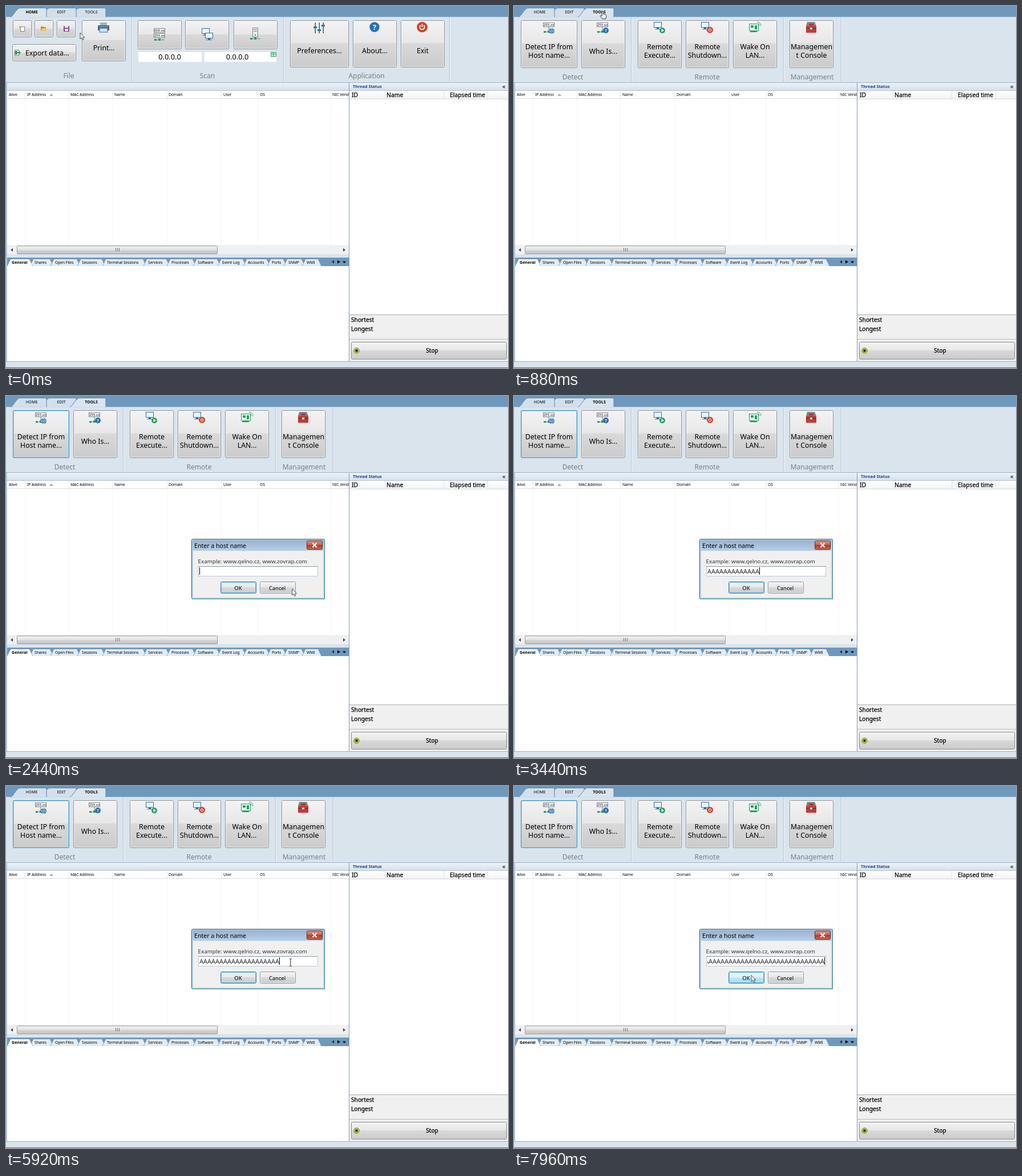
An HTML page for the animation above (8000 ms loop, 880 by 636 pixels).

```html
<!DOCTYPE html>
<html lang="en">
<head>
<meta charset="utf-8">
<title>Network scanner</title>
<style>
  html, body { margin: 0; width: 100%; height: 100%; overflow: hidden; background: #fff; }
  svg { display: block; }
  text { font-family: "Noto Sans", "Open Sans", sans-serif; fill: #000; white-space: pre; }
  .mid { text-anchor: middle; }
  .end { text-anchor: end; }
  .bold { font-weight: 700; }
  .firm { stroke: #000; stroke-width: .25; }
  .group { fill: #77808a; }
  .line { fill: none; }
</style>
</head>
<body>
<svg id="stage" width="880" height="636" viewBox="0 0 880 636" xmlns="http://www.w3.org/2000/svg"></svg>
<script>
const BAR = '#6f99bc', PANEL = '#dae4ed', BLUE = '#2a6fb4', GREEN = '#27a060', RED = '#d0452c', GREY = '#7d8387';

// Markup helpers
const rect = (x, y, w, h, fill, more = '') => `<rect x="${x}" y="${y}" width="${w}" height="${h}" fill="${fill}" ${more}/>`;
const box = (x, y, w, h, fill, stroke, r = 0) =>
  rect(x + .5, y + .5, w - 1, h - 1, fill, `stroke="${stroke}" rx="${r}"`);
const path = (d, fill, more = '') => `<path d="${d}" fill="${fill}" ${more}/>`;
const stroke = (d, color, w = 1) => `<path class="line" d="${d}" stroke="${color}" stroke-width="${w}"/>`;
const disc = (x, y, r, fill) => `<circle cx="${x}" cy="${y}" r="${r}" fill="${fill}"/>`;
const text = (x, y, size, str, cls = '', more = '') =>
  `<text x="${x}" y="${y}" font-size="${size}" class="${cls}" ${more}>${str}</text>`;
const group = (id, body) => `<g id="${id}">${body}</g>`;
const at = (x, y, body) => `<g transform="translate(${x} ${y})">${body}</g>`;
const grad = (id, ...stops) => `<linearGradient id="${id}" x2="0" y2="1">` +
  stops.map(([o, c]) => `<stop offset="${o}" stop-color="${c}"/>`).join('') + '</linearGradient>';

const button = (x, y, w, h, lines = [], base = 0) =>
  box(x, y, w, h, 'url(#btn)', '#8d9297', 2) +
  rect(x + 1.5, y + 1.5, w - 3, h - 3, 'none', 'stroke="#fff" stroke-opacity=".65" rx="1"') +
  lines.map((s, i) => text(x + w / 2, base + i * 15, 12.3, s, 'mid')).join('');
const divider = x => rect(x, 20, 1, 113, '#b4c3d1') + rect(x + 1, 20, 1, 113, '#f2f6fa');

// Icons, drawn around their own centre
const monitor = (x, y) => box(x, y, 14, 10, '#eef5fc', BLUE) + rect(x + 5, y + 10, 4, 2, BLUE) + rect(x + 2, y + 12, 10, 1, BLUE);
const power = r => disc(0, 0, r, RED) +
  stroke(`M${-r * .3} ${-r * .33}A${r * .45} ${r * .45} 0 1 0 ${r * .3} ${-r * .33}M0 ${-r * .6}V0`, '#fff', r * .18);
const help = r => disc(0, 0, r, BLUE) + text(0, r * .53, r * 1.5, '?', 'mid bold', 'style="fill:#fff"');
const field = (y, s) => box(-10, y, 20, 8, '#fff', GREY) + text(0, y + 6.4, 6, s, 'mid');
const wire = y => rect(-9, y, 18, 1, GREY) + rect(-2, y - 2, 4, 4, GREEN) + rect(-9, y - 1, 4, 3, GREEN);
const address = field(-10, '255.xx') + rect(-.5, -2, 1, 7, GREY) + wire(6);
const globe = disc(5, 5, 5, BLUE) +
  stroke('M0 5H10M5 0V10M5 0C1 3 1 7 5 10C9 7 9 3 5 0', '#dcecfb', .7);
const play = disc(4, 5, 5, GREEN) + path('M2.5 2L7 5L2.5 8Z', '#fff');
const printer = rect(-6, -9, 12, 6, '#9eb3c6') + rect(-10, -4, 20, 9, '#55616d', 'rx="1"') +
  rect(-7, 1, 14, 7, '#cfe2f4', `stroke="${BLUE}"`) + rect(-8, -2, 16, 1, '#8fb8dd');
const sliders = [-7, 0, 7].map((x, i) =>
  rect(x - .5, -9, 1.5, 19, '#3b5871') + rect(x - 3, [-2, 3, -5][i], 6, 3, BLUE)).join('');
const server = box(-5, -11, 10, 17, '#e9ecee', GREY) + rect(-3, -8, 6, 1, GREY) + rect(-3, -5, 6, 1, GREY) +
  disc(0, 2, 1.2, GREEN) + wire(8);
const card = box(-10, -7, 17, 13, '#e7f6ec', GREEN) + rect(-7, -4, 5, 4, GREEN) + rect(0, -4, 4, 7, GREEN) +
  rect(-8, 6, 12, 2, GREEN) + stroke('M4 -7A4 4 0 0 1 8 -3M4 -10A7 7 0 0 1 11 -3', GREEN);
const toolbox = path('M-9 -4L-7 -11H6L9 -4Z', '#7a858c') + rect(-4, -8, 8, 3, '#b13029') +
  rect(-9, -4, 18, 12, '#c33a32', 'rx="1"') + rect(-9, 0, 18, 1, '#7d211d') + rect(-2, -1, 4, 3, '#eee');

// Ribbon tabs: earlier ones overlap later ones, the active one lies on top
const tabs = [['HOME', 23, 71, 45], ['EDIT', 75, 123, 97], ['TOOLS', 127, 175, 149.5]];
const ribbonTab = ([name, l, r, c], active) =>
  path(`M${l - 15} 19.5C${l - 9} 17 ${l - 5} 3.5 ${l + 2} 3.5H${r - 2}Q${r} 3.5 ${r} 5.5V19.5`,
    active ? PANEL : '#d3dfeb', 'stroke="#5d83a6"') +
  text(c, 13.2, 6.9, name, active ? 'mid bold' : 'mid');
const ribbonTabs = on => [2, 1, 0].filter(i => i !== on).concat(on).map(i => ribbonTab(tabs[i], i === on)).join('');

const homePage =
  [220, 486, 777].map(divider).join('') +
  button(12, 25, 33, 30) + button(50, 25, 33, 30) + button(89, 25, 33, 30) +
  at(28, 40, box(-3, -4, 8, 9, '#fff', GREY) + disc(-3, -3, 2, '#e8a93a')) +
  at(66, 40, path('M-5 -4H-1L0 -3H4V4H-5Z', '#c98b34') + path('M-3 -1H6L4 4H-5Z', '#f2c46c')) +
  at(106, 40, rect(-5, -5, 10, 10, '#8548a5', 'rx="1"') + rect(-3, -5, 6, 3, '#fff') + rect(-3, 0, 6, 4, '#f0e4f5')) +
  button(11, 67, 112, 30) + text(34, 86.5, 12.3, 'Export data...') +
  at(20, 82, box(-5, -5, 8, 10, '#fff', GREY) + rect(-4, -3, 4, 6, GREEN) + path('M0 -1H3V-3L6 0L3 3V1H0Z', GREEN)) +
  button(133, 25, 77, 72, ['Print...'], 77.5) + at(171, 38, printer) +
  button(231, 25, 77, 51) + button(314, 25, 77, 51) + button(399, 25, 77, 51) +
  at(269, 49, field(-10, '000.xx') + field(-1, '255.xx') + wire(10)) +
  monitor(343, 39) + monitor(349, 47) + at(437, 49, server) +
  box(231, 80, 113, 19, '#fff', '#e3e8ed') + box(347, 80, 128, 19, '#fff', '#e3e8ed') +
  text(287, 93.7, 12.8, '0.0.0.0', 'mid') + text(405.5, 93.7, 12.8, '0.0.0.0', 'mid') +
  at(469, 85, box(-5, -4, 10, 8, '#dff3e5', GREEN) + stroke('M-4 -.5H4M-.5 -3V3', GREEN)) +
  button(498, 25, 103, 83, ['Preferences...'], 82.5) + at(549, 38, sliders) +
  button(608, 25, 77, 83, ['About...'], 82.5) + at(646, 37, help(8.7)) +
  button(692, 25, 77, 83, ['Exit'], 82.5) + at(729.5, 37, power(9.3)) +
  [['File', 110], ['Scan', 353], ['Application', 632]].map(([s, x]) => text(x, 127.3, 12, s, 'mid group')).join('');

const toolsPage =
  [205, 472, 573].map(divider).join('') +
  button(12, 25, 99, 84, ['Detect IP from', 'Host name...'], 76) + at(61, 39, address + globe) +
  button(118, 25, 77, 84, ['Who Is...'], 83.5) + at(155, 39, address + at(6, 4, help(5))) +
  button(217, 25, 77, 84, ['Remote', 'Execute...'], 76) + monitor(245, 28) + at(256, 38, play) +
  button(301, 25, 76, 84, ['Remote', 'Shutdown...'], 76) + monitor(328, 28) + at(343.5, 42, power(5.5)) +
  button(384, 25, 77, 84, ['Wake On', 'LAN...'], 76) + at(422, 38, card) +
  button(483, 25, 77, 84, ['Managemen', 't Console'], 76) + at(521, 39, toolbox) +
  group('hot', box(12, 25, 99, 84, 'none', '#3c8fc4', 2) +
    rect(13.5, 26.5, 96, 81, 'none', 'stroke="#8fd0f0" stroke-opacity=".8"')) +
  [['Detect', 103], ['Remote', 338.5], ['Management', 522.5]].map(([s, x]) => text(x, 128.5, 12, s, 'mid group')).join('');

// Result list, detail tabs and thread panel
const small = (x, y, s) => text(x, y, 6.8, s, '', 'letter-spacing="-.1"');
const columns = [['Alive', 5], ['IP Address', 37], ['MAC Address', 113], ['Name', 190], ['Domain', 285],
  ['User', 381], ['OS', 445], ['NIC Vend', 572]];
const details = [['General', 10], ['Shares', 50], ['Open Files', 86], ['Sessions', 133], ['Terminal Sessions', 177],
  ['Services', 249], ['Processes', 290], ['Software', 336], ['Event Log', 379], ['Accounts', 424],
  ['Ports', 466], ['SNMP', 495], ['WMI', 527]];
const detailTab = ([name, x], i) => {
  const next = i < 12 ? details[i + 1][1] : 556;
  return path(`M${x - 8} 457L${x - 2} 444.5H${next - 9}L${next - 3} 457`, i ? '#e3ebf3' : '#fff', 'stroke="#6c90b0" stroke-width=".7"') +
    (i ? small(x, 452.8, name) : text(x, 452.8, 7.1, name, 'bold'));
};
const detailTabs = details.map(detailTab);
const main =
  rect(0, 134, 880, 502, '#fff') +
  rect(0, 134, 880, 15, 'url(#strip)') + rect(0, 134, 880, 1, '#9fb2c5') + rect(0, 148, 880, 1, '#b4c1cf') +
  rect(0, 162, 601, 1, '#d9dcdf') +
  [33, 110, 186, 282, 377, 441, 569].map(x => rect(x, 150, 1, 12, '#e4e6e8') +
    stroke(`M${x + .5} 163V420`, '#f6f6f6')).join('') +
  columns.map(([s, x]) => small(x, 158, s)).join('') + path('M76 158L79.5 154L83 158Z', '#a5a9ad') +
  rect(2, 420, 599, 16, '#eff0f1') + box(19, 421, 352, 15, 'url(#thumb)', '#989b9e', 1) +
  [192, 195, 198].map(x => rect(x, 425, 1, 6, '#777')).join('') +
  path('M12 425.5V431.5L8 428.5Z', '#444') + path('M591 425.5V431.5L595 428.5Z', '#444') +
  rect(0, 436, 601, 6, PANEL) + rect(0, 442, 601, 15, BAR) +
  detailTabs.slice(1).join('') + detailTabs[0] +
  path('M575 446.5V452.5L571 449.5Z', '#16324b') + path('M581 446.5V452.5L586 449.5Z', '#000') + path('M590 448.5H596L593 452Z', '#000') +
  rect(0, 135, 2, 500, '#b6c9dc') + rect(601, 135, 1, 500, '#7f9cb8') +
  text(608, 144, 7.3, 'Thread Status', 'bold', 'style="fill:#173f91"') + text(870, 145.3, 11, '«') +
  rect(602, 149, 278, 15, 'url(#head)') + rect(602, 163, 278, 1, '#d5d9dd') +
  [664, 767, 844].map(x => rect(x, 149, 1, 14, '#dfe2e5')).join('') +
  text(606, 160.4, 10.4, 'ID', 'firm') + text(667, 160.4, 10.4, 'Name', 'firm') + text(778, 160.4, 10.3, 'Elapsed time', 'firm') +
  rect(602, 542, 278, 83, '#f0f0f0') + rect(602, 542, 278, 1, '#a9adb1') + rect(602, 585, 278, 1, '#b5b9bc') +
  text(605, 555, 10.2, 'Shortest', 'firm') + text(605, 571, 10.2, 'Longest', 'firm') +
  box(605, 590, 273, 31, 'url(#btn)', '#85898d', 2) + text(747, 609.2, 10, 'Stop', 'mid firm') +
  `<circle cx="614.5" cy="605.5" r="4.7" fill="#b8d433" stroke="#6c7d20"/>` + rect(612.5, 603.5, 4, 4, '#222') +
  rect(0, 624, 880, 11, PANEL) + rect(0, 624, 880, 1, '#9fb2c5') + rect(0, 635, 880, 1, '#5d6d7c');

const dialog =
  box(325, 251, 234, 106, 'url(#title)', '#3d4b56', 2) +
  rect(326.5, 252.5, 231, 103, 'none', 'stroke="#cfe6f3" stroke-opacity=".8"') +
  rect(328, 272, 228, 82, '#f0f0f0') + stroke('M326 356.5H558.5V252', '#1d747c') +
  text(330, 267, 10.6, 'Enter a host name') +
  box(527, 254, 28, 16, 'url(#close)', '#6b2a26', 2) + stroke('M537.5 258.5L544.5 265.5M544.5 258.5L537.5 265.5', '#fff', 2.2) +
  text(336.5, 294, 9.8, 'Example: www.qelno.cz, www.zovrap.com', '', 'style="fill:#333"') +
  box(337, 299, 210, 18, '#fff', '#b9c9d8') + rect(337, 299, 210, 1, '#8e9aa6') +
  group('mark', rect(339, 301, 140, 14, '#3399ff')) +
  `<g clip-path="url(#input)"><text id="typed" y="311.5" font-size="10.96"></text></g>` +
  rect(0, 301, 1, 13, '#000', 'id="caret"') +
  box(376, 326, 63, 21, 'url(#btn)', '#3c7fb1', 2) +
  group('okHot', rect(377, 327, 61, 19, 'url(#hover)')) +
  rect(377.5, 327.5, 60, 18, 'none', 'stroke="#5fc4ec" stroke-opacity=".8"') + text(407, 340.8, 9.6, 'OK', 'mid') +
  button(445, 326, 63, 21) + text(475.5, 340.8, 9.4, 'Cancel', 'mid');

const cursors =
  group('arrow', path('M0 0V11L2.6 8.7L4.4 12.8L6.1 12L4.4 8.1H7.8Z', '#fff', 'stroke="#222" stroke-width=".8"')) +
  group('hand', path('M-1.2 1Q0 -.5 1.2 1V5.5L5.5 6.5Q6.4 7 6.2 9L5.3 13.5H-1L-4.5 8.5Q-4 6.8 -1.2 8.5Z', '#fff', 'stroke="#222" stroke-width=".9"')) +
  group('beam', stroke('M-2 -6.5H-.5L0 -6L.5 -6.5H2M0 -6V6M-2 6.5H-.5L0 6L.5 6.5H2', '#222'));

document.getElementById('stage').innerHTML = '<defs>' +
  grad('btn', [0, '#f3f3f3'], [.48, '#e7e7e7'], [.49, '#d9d9d9'], [1, '#cbcbcb']) +
  grad('hover', [0, '#eaf6fd'], [.5, '#d9f0fc'], [.51, '#bee6fd'], [1, '#a7d9f5']) +
  grad('strip', [0, '#eef3f8'], [1, '#d5e0eb']) +
  grad('head', [0, '#fff'], [1, '#f1f2f4']) +
  grad('thumb', [0, '#f2f2f2'], [.5, '#e2e2e2'], [.51, '#d2d2d3'], [1, '#c4c5c7']) +
  grad('title', [0, '#94b0cf'], [.2, '#b9cfe7'], [1, '#b9d1ea']) +
  grad('close', [0, '#dc9a8c'], [.5, '#c9594a'], [.51, '#b33724'], [1, '#cf6a4e']) +
  '<clipPath id="input"><rect x="339" y="300" width="206" height="16"/></clipPath></defs>' +
  rect(0, 0, 880, 20, BAR) + rect(0, 19, 880, 115, PANEL) + rect(0, 19, 880, 1, '#c3d3e2') +
  group('tabsHome', ribbonTabs(0)) + group('tabsTools', ribbonTabs(2)) +
  group('home', homePage) + group('tools', toolsPage) + main + group('dialog', dialog) + cursors;

// Pointer moves: first step, last step, place reached, shape
const STEP = 80;
const moves = [
  [80, 80, 148, 27, 'arrow'], [160, 160, 167, 5, 'hand'], [480, 720, 155.5, 9, 'hand'],
  [1040, 1040, 147, 20, 'arrow'], [1120, 1360, 77, 80, 'arrow'],
  [1560, 1800, 312, 234, 'arrow'], [1880, 2120, 505, 349, 'arrow'], [2360, 2520, 500, 334, 'arrow'],
  [2760, 2840, 492, 267, 'arrow'], [2920, 2920, 384, 303, ''],
  [3600, 3600, 384, 303, 'beam'], [3680, 3760, 402, 306, 'beam'],
  [4040, 4120, 404, 298, 'beam'], [4200, 4360, 410, 304.5, 'beam'], [4520, 4600, 463, 309, 'beam'],
  [5000, 5240, 444.5, 310, 'beam'], [5600, 5680, 497, 310, 'beam'], [5920, 6240, 506, 310.5, 'beam'],
  [6520, 7000, 464, 312, 'beam'], [7080, 7160, 455, 317, 'beam'], [7240, 7320, 440, 321, 'arrow'],
  [7400, 7560, 432, 322, 'arrow'], [7720, 7960, 416, 332.5, 'arrow']];

const $ = id => document.getElementById(id);
const fade = (id, v) => $(id).setAttribute('opacity', Math.max(0, Math.min(1, v)));
const stepped = (t, from, to) =>
  Math.max(0, Math.min(1, (Math.floor((t - from) / STEP) + 1) / ((to - from) / STEP + 1)));

function movePointer(t) {
  let x = 130, y = 47, shape = 'arrow';
  for (const [from, to, x1, y1, kind] of moves) {
    if (t < from) break;
    const k = stepped(t, from, to);
    x += (x1 - x) * k;
    y += (y1 - y) * k;
    shape = kind;
  }
  for (const id of ['arrow', 'hand', 'beam']) fade(id, id === shape);
  if (shape) $(shape).setAttribute('transform', `translate(${x} ${y})`);
}

// One key press, then key repeat, then a paste that overflows the field
function letters(t) {
  if (t < 2520) return 0;
  if (t < 2760) return 1;
  if (t < 6000) return Math.min(20, 2 + Math.floor((t - 2760) / 57));
  return 31;
}

function draw(now) {
  const t = Math.floor(now % 8000 / 40) * 40;
  const switched = t >= 800;
  fade('tabsHome', !switched);
  fade('tabsTools', switched);
  fade('home', !switched);
  fade('tools', switched);
  fade('hot', stepped(t, 1280, 1360));
  fade('dialog', stepped(t, 1400, 1480));

  const n = letters(t), full = n > 29, picked = t >= 5000 && t < 5920;
  const typed = $('typed');
  typed.textContent = 'A'.repeat(n);
  typed.setAttribute('x', full ? 544 : 339);
  typed.setAttribute('class', full ? 'end' : '');
  typed.style.fill = picked ? '#fff' : '#333';
  fade('mark', picked);
  const inside = t >= 4360 && t < 5000;
  $('caret').setAttribute('x', full ? 544 : 339 + 7 * (inside ? 10 : n));
  fade('okHot', stepped(t, 7720, 7960));
  movePointer(t);
}

function loop() {
  draw(performance.now());
  requestAnimationFrame(loop);
}
loop();
</script>
</body>
</html>
```
